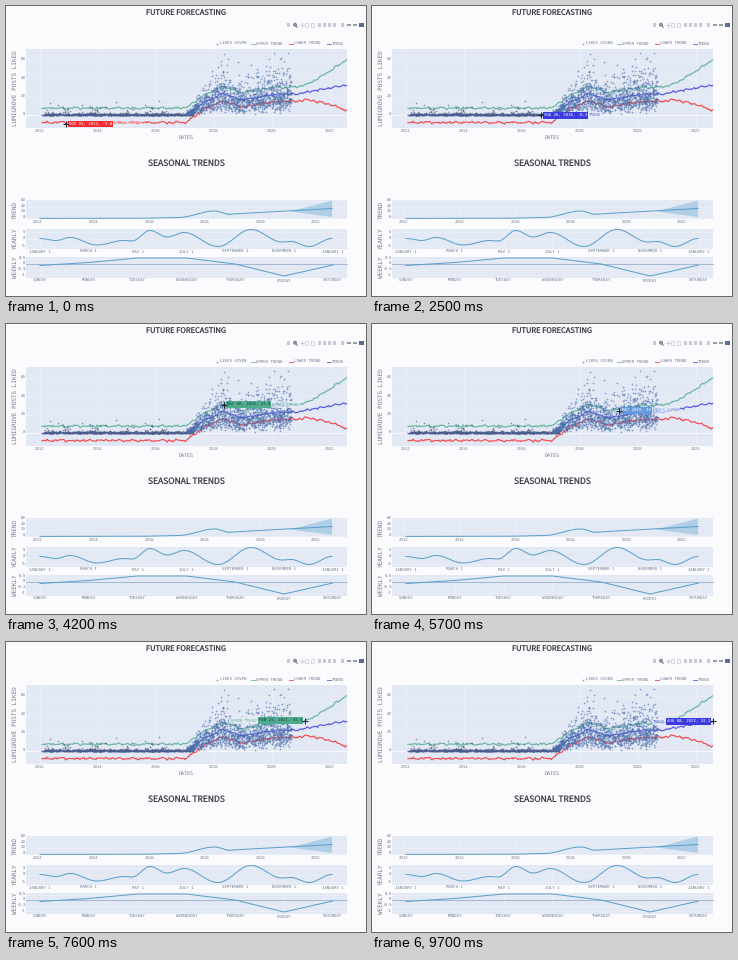
Write a matplotlib script that moves like this. It is 360x290 px and loops after 9.8 s.

```python
import numpy as np
import matplotlib.pyplot as plt
from matplotlib.animation import FuncAnimation
from matplotlib.patches import Rectangle, Circle

W, H, DPI = 360, 290, 100
FRAMES, STEP = 98, 100
PT = 72 / DPI
PANEL, GRID, INK, PALE = "#e2e8f4", "#ebf0f8", "#747d92", "#c6cad4"
GREEN, RED, BLUE, DOT = "#4dac8d", "#f22c30", "#3a3ae2", "#4c70ac"
PLOT = "#5a9fcb"
MONTHS = ("JANUARY FEBRUARY MARCH APRIL MAY JUNE JULY AUGUST SEPTEMBER "
          "OCTOBER NOVEMBER DECEMBER").split()
DAYS = "SUNDAY MONDAY TUESDAY WEDNESDAY THURSDAY FRIDAY SATURDAY".split()
rng = np.random.default_rng(12)

plt.rcParams["text.hinting"] = "none"
plt.rcParams["text.hinting_factor"] = 1
fig = plt.figure(figsize=(W / DPI, H / DPI), dpi=DPI, facecolor="#fbfbfd")
ax = fig.add_axes([0, 0, 1, 1])
ax.set_xlim(0, W)
ax.set_ylim(H, 0)
ax.axis("off")


def text(x, y, s, px=4.1, font="DejaVu Sans Mono", color=INK, ha="center", **kw):
    return ax.text(x, y, s, fontsize=px * PT, family=font, color=color,
                   ha=ha, va="center", **kw)


def line(x, y, color, px=1.0, z=3, **kw):
    ax.plot(x, y, color=color, lw=px * PT, zorder=z, **kw)


def dots(x, y, color=DOT, size=1.25, alpha=0.65, z=6):
    ax.plot(x, y, "o", ms=size, mew=0, color=color, alpha=alpha, zorder=z)


def rect(x, y, w, h, color, z=1):
    return ax.add_patch(Rectangle((x, y), w, h, fc=color, ec="none", zorder=z))


def panel(top, bottom, label, xs, names, tick_y, ys, values, size=5.8):
    rect(20, top, 321, bottom - top, PANEL)
    for x, name in zip(xs, names):
        line([x, x], [top, bottom], GRID, 0.7, 2)
        text(x, tick_y, name)
    for y, value in zip(ys, values):
        line([20, 341], [y, y], GRID, 0.7, 2)
        text(19.5, y, value, 3.8, ha="right")
    text(9.5, (top + bottom) / 2, label, size, rotation=90)


def ease(points, n=300):
    """Curve through turning points with a cosine ease between them."""
    px, py = np.array(points, float).T
    x = np.linspace(px[0], px[-1], n)
    i = np.clip(np.searchsorted(px, x) - 1, 0, len(px) - 2)
    u = (x - px[i]) / (px[i + 1] - px[i])
    return x, py[i] + (py[i + 1] - py[i]) * (1 - np.cos(np.pi * u)) / 2


# Titles
TITLE = dict(font="Noto Sans CJK JP", color="#3f4046")
text(180, 7.6, "FUTURE FORECASTING", 7.5, **TITLE)
text(180, 157.5, "SEASONAL TRENDS", 8.5, **TITLE)

# Toolbar
ax.add_patch(Circle((289, 18.7), 1.4, fc="#a0a6b4", ec="#707785", lw=0.7))
line([290, 291.3], [20, 21.3], "#707785", 1)
line([293.5, 297.5], [19, 19], PALE, 0.9)
line([295.5, 295.5], [17, 21], PALE, 0.9)
for x in (299, 304.5):
    ax.add_patch(Rectangle((x, 17.3), 3.2, 3.2, fc="none", ec=PALE, lw=0.5))
for x in (281, 311.5, 316.5, 322, 327, 335):
    rect(x, 17.3, 3.2, 3.5, PALE)
for x in (341, 347):
    rect(x, 17.7, 3.5, 2.8, "#969cab")
rect(353.3, 16.7, 4.2, 4.6, "#5d6a94")

# Legend
dots(210.5, 38)
text(214, 38, "LIKES GIVEN", ha="left")
for x, name, color in ((246, "UPPER TREND", GREEN), (283.5, "LOWER TREND", RED),
                       (322, "TREND", BLUE)):
    line([x - 1, x + 3], [38, 38], color, 1, alpha=0.7)
    text(x + 4, 38, name, ha="left")

# Panels
years = range(2012, 2024, 2)
month_x = 34 + 48.8 * np.arange(7)
panel(43, 122, "LUMIGROVE POSTS LIKED", 34 + 57.9 * np.arange(6), years, 125.5,
      109 - 18.3 * np.arange(4), range(0, 80, 20), 6.1)
panel(194, 213, "TREND", 32 + 55.6 * np.arange(6), years, 217.3,
      212 - 5.7 * np.arange(4), range(0, 80, 20))
panel(222.5, 242.5, "YEARLY", month_x, [m + " 1" for m in MONTHS[::2] + MONTHS[:1]],
      246.3, (226, 233, 240), (5, 0, -5))
panel(251, 271.5, "WEEKLY", month_x, DAYS, 275, (253, 258, 263.5, 269),
      ("0.5", "0", "-0.5", "-1"))
text(180.5, 132, "DATES", 4.6)
line([20, 341], [109, 109], "#f6f8fc", 1.1, 2)
line([20, 341], [258, 258], "#94abc8", 0.8, 2)

# Forecast lines: one trend with a band that opens at the end
XS = np.linspace(36, 340.5, 305)
KEYS = [(180, 109.3), (197, 97), (217, 87.5), (236, 94), (268, 88.5), (290, 88),
        (340, 79)]
base = np.interp(XS, *np.array(KEYS).T)
band = 7.2 + 18 * np.clip((XS - 298) / 42, 0, 1) ** 1.3


def wiggle():
    season = np.sin(XS * 2 * np.pi / 14.5) + np.sin(XS * 2 * np.pi / 7.2)
    return 0.4 * season + rng.normal(0, 0.45, XS.size)


trend = base + 0.8 * wiggle()
upper = base - band + wiggle()
lower = base + band + wiggle()
for ys, color in ((upper, GREEN), (lower, RED), (trend, BLUE)):
    line(XS, ys, color, 1.15, 5, alpha=0.85)

# Likes: near zero at first, then scattered around the trend
quiet_x = rng.uniform(37, 187, 800)
quiet = rng.exponential(np.where(rng.random(800) < 0.14, 3.4, 0.5))
dots(quiet_x, 108.9 - quiet, "#4a5c88", 1.15)
busy_x = rng.uniform(181, 285, 1250)
mean = np.maximum(109 - np.interp(busy_x, XS, base), 2)
busy = np.minimum(rng.gamma(3.6, mean / 3.6), 62)
dots(busy_x, 108.8 - busy, alpha=0.6)

# Seasonal curves
ax.fill([284, 326, 326], [205.5, 194.5, 211], color="#b0cfe7", lw=0, zorder=3)
line([34, 140, 172], [212.4, 212.2, 211.5], PLOT)
line(*ease([(172, 211.5), (209, 205), (223, 208.2)]), PLOT)
line([223, 326], [208.2, 202.5], PLOT)
line(*ease([(34, 232.5), (50, 234.5), (64, 231.5), (91, 239), (118, 234.5),
            (126, 235), (144, 224.5), (161, 231), (178, 226.5), (212, 240.5),
            (245, 223.5), (276, 236), (285, 235.5), (303, 240.5), (326, 232.5)]), PLOT)
line(month_x, [259.5, 256.5, 252, 252, 258, 270, 259], PLOT)

# Hover label
SIZE, TALL, GAP = 4.0, 6.6, 2
SERIES = {
    "UPPER TREND": (upper, GREEN, "#1d3b33"),
    "LOWER TREND": (lower, RED, "white"),
    "TREND": (trend, BLUE, "white"),
    "LIKES GIVEN": (base, "#6299e0", "white"),
}
SPELLS = [(0, "LOWER TREND"), (9, "UPPER TREND"), (21, "TREND"),
          (28, "LIKES GIVEN"), (38, "UPPER TREND"), (50, "LIKES GIVEN"),
          (63, "UPPER TREND"), (80, "TREND")]
PATH = [(0, 60), (16, 144), (33, 191), (42, 218), (57, 247), (76, 299), (97, 341)]

name_box = rect(0, 0, 1, TALL, "#e9eef7", 7)
name_box.set_alpha(0.65)
value_box = rect(0, 0, 1, TALL, RED, 7)
name_text = text(0, 0, "", SIZE, zorder=8, alpha=0.75)
value_text = text(0, 0, "", SIZE, zorder=8)
cursor, = ax.plot([], [], "+", color="#1a2030", ms=3.8, mew=0.75, zorder=9)


def caption(x, y, name):
    year = 2012 + (x - 34) / 28.95
    month, day = divmod(year % 1 * 12, 1)
    month = MONTHS[int(month)][:3]
    value = (109 - y) / 0.915
    if name == "LIKES GIVEN":
        return f"{month} {int(year)}, {value:.0f}"
    return f"{month} {1 + int(day * 28):02d}, {int(year)}, {value:.1f}"


def width(s):
    return len(s) * SIZE * 0.6 + 2


def place(box, label, left, y, s):
    box.set_xy((left, y - TALL / 2))
    box.set_width(width(s))
    label.set_position((left + width(s) / 2, y))
    label.set_text(s)


def draw(k):
    name = [n for start, n in SPELLS if start <= k][-1]
    ys, color, ink = SERIES[name]
    x = np.interp(k, *np.array(PATH).T)
    y = np.interp(x, XS, ys)
    if name == "LIKES GIVEN":
        y += 2 * np.sin(2 * k) - 7  # hops between nearby dots
    s = caption(x, y, name)
    if x > 265:
        left = x - GAP - width(s)
        name_left = left - width(name)
    else:
        left = x + GAP
        name_left = left + width(s)
    place(value_box, value_text, left, y, s)
    place(name_box, name_text, name_left, y, name)
    value_box.set_facecolor(color)
    value_text.set_color(ink)
    name_text.set_color(color)
    cursor.set_data([x], [y])
    return value_box, value_text, name_box, name_text, cursor


anim = FuncAnimation(fig, draw, frames=FRAMES, interval=STEP, repeat=True,
                     repeat_delay=0, blit=False)
plt.show()
```
